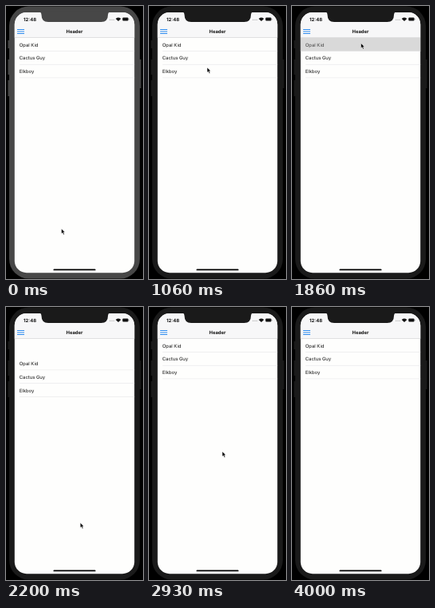
Write an HTML page that moves like this. It is 172 px wide and 342 px high and loops after 4.13 s.

```html
<!DOCTYPE html>
<html lang="en">
<head>
<meta charset="utf-8">
<title>List with overscroll</title>
<style>
html, body { margin: 0; width: 100%; height: 100%; overflow: hidden; background: #000; }
svg { display: block; }
text { font: 5.9px Inter, Roboto, sans-serif; fill: #111; text-rendering: geometricPrecision; }
.bold { font-weight: 700; }
</style>
</head>
<body>
<svg width="172" height="342" viewBox="0 0 172 342">
  <defs>
    <clipPath id="screen"><rect x="10.8" y="8" width="150.4" height="326.2" rx="15"/></clipPath>
    <clipPath id="content"><rect x="10" y="40" width="152" height="295"/></clipPath>
  </defs>
  <g class="shell">
    <path d="M2.5 43h3v10h-3zM2.5 67h3v19h-3zM2.5 93h3v20h-3zM166 67h3.5v36h-3.5z"/>
    <rect x="4" y=".5" width="164" height="341" rx="24.5"/>
  </g>
  <g clip-path="url(#screen)">
    <rect x="10" y="8" width="152" height="327" fill="#fefefd"/>
    <g clip-path="url(#content)"><g id="list"></g></g>
    <rect x="10" y="8" width="152" height="31.5" fill="#f7f7f8"/>
    <rect x="10" y="39.3" width="152" height=".6" fill="#cfcfd1"/>
    <path d="M14 29.5h9M14 32h9M14 34.5h9" stroke="#2f8df0"/>
    <text class="bold" x="86" y="34" text-anchor="middle">Header</text>
    <text class="bold" x="22" y="19.1">12:48</text>
    <path d="M130 17.3h6" stroke="#aaa" stroke-dasharray="1 .65"/>
    <path d="M141 19.1l-3.3-3.2q3.3-2.6 6.6 0z" fill="#111"/>
    <rect x="146.3" y="14.6" width="7.2" height="4" rx="1" fill="#111"/>
    <path d="M154.2 15.9v1.4" stroke="#777" stroke-width=".7"/>
    <rect x="59.5" y="329.4" width="53" height="1.9" rx=".9" fill="#000"/>
  </g>
  <path class="shell" d="M42.5 7.5Q44.5 8 44.5 11Q44.5 20 53 20H119.5Q128 20 128 11Q128 8 130 7.5z"/>
  <path id="cursor" d="M0 0V6.3L1.5 5L2.6 7.5L3.8 7L2.7 4.6H4.6z" stroke="#fff" stroke-width=".5"/>
</svg>
<script>
const $ = id => document.getElementById(id);
const LOOP = 4130, TICK = 1000 / 15, TOP = 40, ROW = 16.7;
const FOCUS = 12, PRESS = 18, HIDE = 58;

// Pointer stops, in ticks; a drag lasts until the next stop
const stops = [
  { k: 3, x: 69.5, y: 279 },
  { k: 7, x: 46, y: 170 },
  { k: 11, x: 79, y: 70 },
  { k: 16, x: 73, y: 77 },
  { k: 17, x: 73, y: 77 },
  { k: 23, x: 78, y: 62 },
  { k: 28, x: 86.5, y: 46.6, drag: true },
  { k: 32, x: 93, y: 285 },
  { k: 36.7, x: 95, y: 158.5, drag: true },
  { k: 41, x: 96, y: 270 },
  { k: 44, x: 92, y: 181 },
  { k: 49, x: 98, y: 160 },
  { k: 57, x: 19.5, y: 335 }
];

$('list').innerHTML = ['Opal Kid', 'Cactus Guy', 'Elkboy'].map((name, i) => `
  <g transform="translate(0 ${TOP + i * ROW})">
    <rect class="press" x="10" width="152" height="${ROW}" fill="#d9d9d9"/>
    <text x="16.8" y="10.8">${name}</text>
    <rect x="17" y="${ROW - .5}" width="145" height=".6" fill="#e6e6e8"/>
  </g>`).join('');
const presses = document.querySelectorAll('.press');
const shells = document.querySelectorAll('.shell');

function pointer(k) {
  const i = Math.max(0, stops.findLastIndex(s => s.k <= k));
  const a = stops[i], b = stops[i + 1] ?? a;
  const u = Math.max(0, (k - a.k) / (b.k - a.k || 1));
  const ease = u * u * (3 - 2 * u);
  return { x: a.x + (b.x - a.x) * ease, y: a.y + (b.y - a.y) * ease };
}

const rubber = d => 295 * (1 - 1 / (d * .55 / 295 + 1));

// The list follows a drag with resistance, then springs back
function pull(k) {
  const i = stops.findLastIndex(s => s.drag && s.k <= k);
  if (i < 0) return 0;
  const end = stops[i + 1].k;
  const stretch = rubber(pointer(Math.min(k, end)).y - stops[i].y);
  const offset = stretch * Math.exp(-1.4 * Math.max(0, k - end));
  return offset < .9 ? 0 : offset;
}

function draw(time) {
  const k = Math.floor((time % LOOP + 7) / TICK);
  const { x, y } = pointer(k);
  const touching = k > PRESS && !pull(k);
  shells.forEach(s => s.setAttribute('fill', k < FOCUS ? '#474747' : '#1a1a1a'));
  $('cursor').setAttribute('transform', `translate(${x} ${y})`);
  $('cursor').style.display = k < HIDE ? '' : 'none';
  $('list').setAttribute('transform', `translate(0 ${pull(k)})`);
  presses.forEach((press, row) => {
    const on = touching && Math.floor((y - TOP) / ROW) === row;
    press.style.opacity = +on;
    press.nextElementSibling.style.opacity = on ? .75 : 1;
  });
}

let origin;
function loop(now) {
  origin ??= now;
  draw(now - origin);
  requestAnimationFrame(loop);
}
draw(0);
requestAnimationFrame(loop);
</script>
</body>
</html>
```
